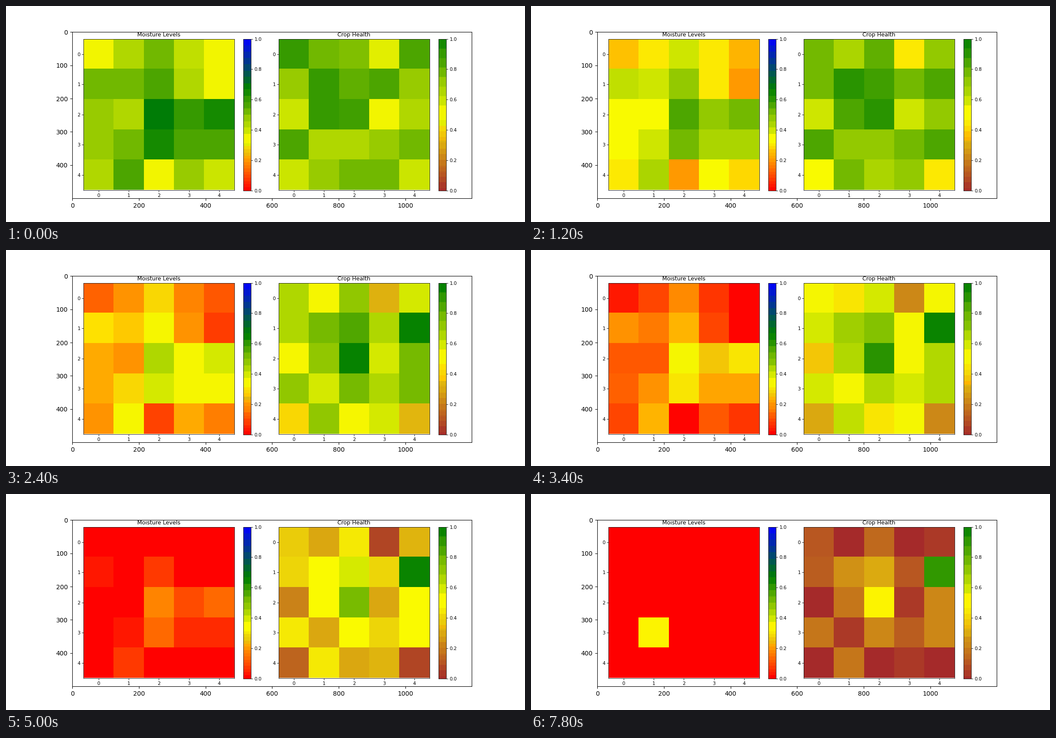
Recreate the animation shown at these times as a matplotlib script. Size 1159 px wide and 483 px high, loop 8000 ms.

```python
import numpy as np
import matplotlib.pyplot as plt
from matplotlib.animation import FuncAnimation
from matplotlib.colors import LinearSegmentedColormap
from matplotlib.transforms import Affine2D

W, H = 1159, 483
FRAMES, INTERVAL = 40, 200
SCALE = 0.744            # size of the inner chart relative to its normal size
CELL_WEIGHT = 200        # area of a cell relative to one colour bar row

plt.rcParams["font.family"] = "DejaVu Sans"

WET = LinearSegmentedColormap.from_list("wet", ["red", "yellow", "green", "blue"])
CROP = LinearSegmentedColormap.from_list("crop", ["brown", "yellow", "green"])

MOISTURE = np.array([
    [.372, .431, .5205, .415, .355],
    [.535, .503, .5815, .431, .319],
    [.462, .447, .675, .598, .638],
    [.467, .530, .638, .558, .558],
    [.431, .574, .327, .459, .405],
])
HEALTH = np.array([
    [.882, .753, .7495, .560, .828],
    [.725, .876, .812, .865, .690],
    [.619, .910, .873, .540, .670],
    [.865, .631, .670, .695, .790],
    [.610, .723, .780, .768, .570],
])


def simulate():
    """Soil dries steadily; crops grow while moist and wither when dry."""
    wet, crop = MOISTURE.copy(), HEALTH.copy()
    states = [(wet, crop)]
    for step in range(1, FRAMES):
        wet, crop = wet.copy(), crop.copy()
        if step < 36:
            crop[1, 4] = min(crop[1, 4] + .05, 1)   # fertilise
        else:
            wet[3, 1] += .1                         # irrigate
        wet = np.clip(wet - .02, 0, 1)
        crop = np.clip(crop + np.where(wet > .4, .01, -.02), 0, 1)
        states.append((wet, crop))
    return states


def rgb(cmap, values):
    return cmap(np.ravel(values), bytes=True)[:, :3].astype(int)


def posterize(colors, weights):
    """Replace each colour by the weighted mean of its coarse RGB bucket."""
    key = (colors[:, 0] >> 5) * 128 + (colors[:, 1] >> 4) * 8 + (colors[:, 2] >> 5)
    _, group = np.unique(key, return_inverse=True)
    group = group.ravel()
    total = np.bincount(group, weights)
    mean = [np.bincount(group, weights * colors[:, c]) / total for c in range(3)]
    return np.stack(mean, axis=1)[group].round().astype(np.uint8)


STATES = simulate()
RAMP = (np.arange(256) + .5) / 256
WEIGHTS = np.repeat([CELL_WEIGHT, 1, CELL_WEIGHT, 1], [25, 256, 25, 256])

fig = plt.figure(figsize=(W / 100, H / 100), dpi=100, facecolor="white")
PX = Affine2D().scale(1 / W, -1 / H).translate(0, 1) + fig.transFigure

outer = fig.add_subplot()
outer.set_aspect("equal")
outer.set(xlim=(-.5, 1199.5), ylim=(499.5, -.5),
          xticks=range(0, 1200, 200), yticks=range(0, 500, 100))


def inner_axes(x0, y0, x1, y1):
    ax = fig.add_axes([x0 / W, 1 - y1 / H, (x1 - x0) / W, (y1 - y0) / H])
    ax.tick_params(length=3.5 * SCALE, pad=3.5 * SCALE, width=.8 * SCALE,
                   labelsize=10 * SCALE)
    for spine in ax.spines.values():
        spine.set_linewidth(.8 * SCALE)
    return ax


def panel(x, title):
    """Heat map with its colour bar; returns both images."""
    heat = inner_axes(x, 74.3, x + 336.3, 411.5)
    cells = heat.imshow(np.zeros((5, 5, 3), np.uint8), aspect="auto",
                        interpolation="nearest")
    heat.set(xticks=range(5), yticks=range(5))
    outer.text(x + 168.1, 68, title, transform=PX, ha="center", va="baseline",
               fontsize=12 * SCALE, clip_on=True, zorder=2)

    bar = inner_axes(x + 357, 73.5, x + 374, 412.6)
    ramp = bar.imshow(np.zeros((256, 1, 3), np.uint8), aspect="auto",
                      origin="lower", extent=(0, 1, 0, 1),
                      interpolation="nearest")
    bar.yaxis.tick_right()
    bar.set(xticks=[], yticks=np.linspace(0, 1, 6))
    bar.set_yticklabels([f"{v:.1f}" for v in np.linspace(0, 1, 6)])
    return cells, ramp


images = panel(173.3, "Moisture Levels") + panel(609.2, "Crop Health")


def update(frame):
    wet, crop = STATES[frame]
    colors = np.concatenate([rgb(WET, wet), rgb(WET, RAMP),
                             rgb(CROP, crop), rgb(CROP, RAMP)])
    parts = np.split(posterize(colors, WEIGHTS), [25, 281, 306])
    for image, part in zip(images, parts):
        shape = (5, 5, 3) if len(part) == 25 else (256, 1, 3)
        image.set_data(part.reshape(shape))
    return images


anim = FuncAnimation(fig, update, frames=FRAMES, interval=INTERVAL,
                     init_func=lambda: update(0), repeat=True, blit=False)
plt.show()
```
